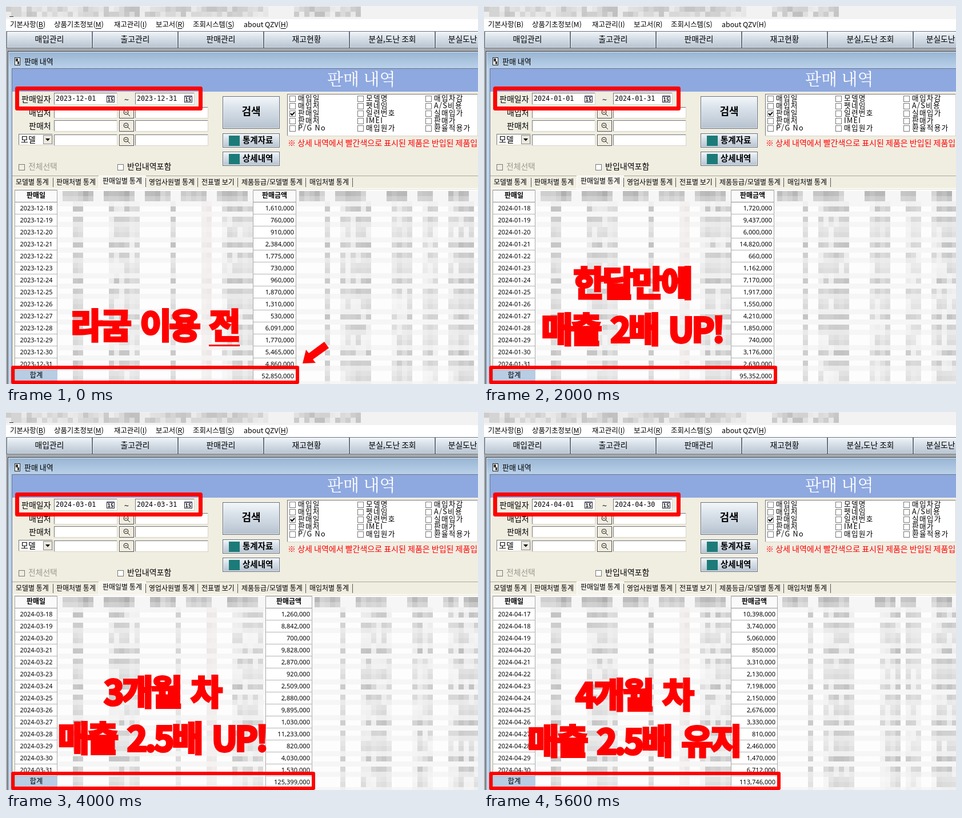
Write an HTML page with a canvas that moves like this. It is 826 by 662 pixels and loops after 6 s.

```html
<!DOCTYPE html>
<html lang="ko">
<head>
<meta charset="utf-8">
<style>
html, body { margin: 0; width: 100%; height: 100%; overflow: hidden; background: #fff; }
canvas { display: block; }
</style>
</head>
<body>
<canvas id="stage" width="826" height="662"></canvas>
<script>
const g = document.getElementById('stage').getContext('2d');
const SANS = '"Noto Sans CJK KR", "Noto Sans KR", sans-serif';
const SERIF = '"Noto Serif CJK KR", "Noto Sans CJK KR", serif';
const MONO = '"DejaVu Sans Mono", monospace';
const DIGITS = '"Noto Sans", sans-serif';
const RED = '#ff0000', FORM = '#f0ede1';
const CELL = 9, ROW = 21, TOP = 343;

// sums: daily amounts in thousands; edges: right edges of the blurred columns
const months = [
  { ym: '2023-12', last: 31, col: [432, 508], total: 52850,
    sums: '1610 760 910 2384 1775 730 960 1870 1310 530 6091 1770 5465 4860',
    edges: [135, 234, 297, 360, 432, 567, 639, 711, 756, 819],
    x: 262, y: 582, lines: ['라굼 이용 전'], arrow: true },
  { ym: '2024-01', last: 31, col: [432, 508], total: 95352,
    sums: '1720 9437 6000 14820 660 1162 7170 1917 1550 4210 1850 740 3176 2630',
    edges: [135, 234, 297, 360, 432, 567, 639, 711, 765, 828],
    x: 261, y: 508, lines: ['한달만에', '매출 2배 UP!'] },
  { ym: '2024-02', last: 29, col: [442, 518], total: 97734,
    sums: '3312 2860 2795 230 4759 9185 880 7725 1000 1630 1900 1100 4158 12500',
    edges: [135, 234, 306, 369, 441, 576, 648, 720, 774, 828],
    x: 267, y: 508, lines: ['2개월 차', '매출 2배 유지'] },
  { ym: '2024-03', last: 31, col: [454, 536], total: 125399,
    sums: '1260 8842 700 9828 2870 920 2509 2880 9895 1030 11233 820 4030 1530',
    edges: [135, 234, 306, 369, 450, 594, 675, 747, 801, 846],
    x: 275, y: 513, lines: ['3개월 차', '매출 2.5배 UP!'] },
  { ym: '2024-04', last: 30, col: [432, 514], total: 113746,
    sums: '10398 3740 5060 850 3310 2130 7198 2150 2676 3330 810 2460 1470 6712',
    edges: [135, 234, 297, 360, 432, 576, 648, 729, 765, 828],
    x: 264, y: 518, lines: ['4개월 차', '매출 2.5배 유지'] }
];
const bodyWidths = [18, 54, 9, 18, 54, 9, 54, 36, 27, 45];
const headWidths = [54, 54, 45, 45, 54, 45, 54, 36, 27, 36];

const noise = (a, b, c) => {
  const s = Math.sin(a * 12.9898 + b * 78.233 + c * 37.719) * 43758.5453;
  return s - Math.floor(s);
};
const overlap = (a, b, c, d) => Math.max(0, Math.min(b, d) - Math.max(a, c));

function rect(x, y, w, h, fill) {
  g.fillStyle = fill;
  g.fillRect(x, y, w, h);
}

function frame(x, y, w, h, stroke, fill) {
  if (fill) rect(x, y, w, h, fill);
  g.strokeStyle = stroke;
  g.lineWidth = 1;
  g.strokeRect(x + .5, y + .5, w - 1, h - 1);
}

function text(s, x, y, size = 14, { color = '#000', align = 'left', font = SANS, weight = 400, gap = 0 } = {}) {
  g.font = `${weight} ${size}px ${font}`;
  g.letterSpacing = gap + 'px';
  g.fillStyle = color;
  g.textAlign = align;
  g.fillText(s, x, y);
}

function shade(y, h, ...colors) {
  const grad = g.createLinearGradient(0, y, 0, y + h);
  colors.forEach((c, i) => grad.addColorStop(i / (colors.length - 1), c));
  return grad;
}

function button(x, y, w, h) {
  frame(x, y, w, h, '#63707e', shade(y, h, '#f5f8fb', '#dbe3eb', '#c9d3de', '#b4c0cd'));
  g.strokeStyle = '#ffffff90';
  g.strokeRect(x + 1.5, y + 1.5, w - 3, h - 3);
}

function field(x, y, w, h) {
  rect(x, y, w, h, '#fff');
  rect(x, y, w, 1, '#777');
  rect(x, y, 1, h, '#777');
  rect(x, y + h - 1, w, 1, '#d8d4c8');
  rect(x + w - 1, y, 1, h, '#d8d4c8');
}

function checkbox(x, y, on, fill = '#fff') {
  frame(x, y, 11, 11, '#777', fill);
  if (!on) return;
  g.strokeStyle = '#000';
  g.lineWidth = 2;
  g.beginPath();
  g.moveTo(x + 2, y + 5);
  g.lineTo(x + 4.5, y + 8);
  g.lineTo(x + 9, y + 3);
  g.stroke();
}

function calendar(x, y) {
  frame(x, y, 14, 12, '#223', '#fff');
  rect(x, y, 14, 2, '#446');
  text('15', x + 7, y + 10, 9, { align: 'center', font: MONO, weight: 700 });
}

function lens(y) {
  frame(198, y, 26, 20, '#555', FORM);
  rect(199, y + 1, 24, 1, '#fff');
  rect(199, y + 1, 1, 18, '#fff');
  g.strokeStyle = '#222';
  g.beginPath();
  g.arc(210, y + 9, 4, 0, 7);
  g.moveTo(213, y + 12);
  g.lineTo(217, y + 16);
  g.moveTo(208, y + 9);
  g.lineTo(212, y + 9);
  g.stroke();
}

function redBox(x, y, w, h, width) {
  g.strokeStyle = RED;
  g.lineWidth = width;
  g.lineJoin = 'round';
  g.strokeRect(x, y, w, h);
  g.lineJoin = 'miter';
}

function drawMenus(n) {
  rect(0, 0, 826, 23, '#f2f2f2');
  for (let x = 0; x < 621; x += CELL)
    for (let y = 0; y < 18; y += CELL)
      if (x < 455 || x > 500) {
        const v = 190 + 48 * noise(x, y, 3);
        rect(x, y + 1, CELL, CELL, `rgb(${v},${v},${v})`);
      }
  if (n === 0 || n === 3) rect(6, 18, 7, 1, '#333');

  rect(0, 23, 826, 21, '#fff');
  [[7, '기본사항', 'B'], [84, '상품기초정보', 'M'], [189, '재고관리', 'I'],
   [262, '보고서', 'R'], [327, '조회시스템', 'S'], [416, 'about QZV', 'H']].forEach(([x, label, key]) => {
    text(`${label}(${key})`, x, 37, 12.4);
    const left = x + g.measureText(label + '(').width;
    if (n !== 1) rect(left, 39, g.measureText(key).width, 1, '#000');
  });

  rect(0, 44, 826, 36, '#a5a9ad');
  ['매입관리', '출고관리', '판매관리', '재고현황', '분실,도난 조회', '분실도난 재고조회'].forEach((s, i) => {
    button(1 + i * 150, 44, 150, 30);
    text(s, 76 + i * 150, 63, 13.8, { align: 'center' });
  });
}

function drawWindow() {
  rect(0, 75, 826, 587, '#a5a9ad');
  rect(3, 79, 823, 583, '#2f3a47');
  rect(4, 80, 822, 582, '#b9d1ea');
  rect(4, 80, 822, 30, shade(80, 30, '#98b4d2', '#bbd2ea'));
  rect(4, 80, 822, 1, '#e8f0f8');
  rect(4, 80, 1, 582, '#e8f0f8');
  frame(15, 90, 10, 14, '#222', '#fff');
  rect(17, 92, 4, 5, '#333');
  rect(20, 97, 3, 5, '#333');
  text('판매 내역', 32, 102, 13);
  rect(10, 109, 816, 553, '#687586');
  rect(11, 110, 815, 552, FORM);
  rect(11, 110, 815, 40, '#8ea8e0');
  text('판매 내역', 562, 139, 29, { color: '#fff', font: SERIF, weight: 500 });
}

function drawForm(m) {
  text('판매일자', 27, 168);
  field(84, 152, 111, 21);
  field(226, 152, 104, 21);
  text(`${m.ym}-01`, 87, 166, 11.7, { font: MONO });
  text(`${m.ym}-${m.last}`, 229, 166, 11.7, { font: MONO });
  text('~', 207, 168, 13, { font: MONO });
  calendar(176, 157);
  calendar(312, 157);

  [177, 200, 225].forEach((y, i) => {
    field(84, y, 111, 20);
    field(226, y, 128, 20);
    lens(y);
    if (i < 2) text(['매입처', '판매처'][i], 40, y + 15);
  });
  field(22, 224, 60, 20);
  text('모델', 26, 239);
  frame(65, 226, 16, 16, '#888', '#ece9df');
  g.fillStyle = '#000';
  g.beginPath();
  g.moveTo(69, 232);
  g.lineTo(77, 232);
  g.lineTo(73, 236.5);
  g.fill();

  checkbox(22, 277, false, FORM);
  text('전체선택', 39, 286, 13.8, { color: '#9b988e' });
  checkbox(195, 277);
  text('반입내역포함', 212, 286, 14);

  button(379, 158, 100, 57);
  text('검색', 429, 191, 18, { align: 'center', weight: 700 });
  ['통계자료', '상세내역'].forEach((s, i) => {
    const y = 223 + i * 32;
    button(379, y, 100, 25);
    rect(390, y + 4, 19, 18, '#1c7b78');
    text(s, 414, y + 17, 14.5, { weight: 700 });
  });

  field(492, 154, 334, 74);
  [['매입일', '매입처', '판매일', '판매처', 'P/G No'],
   ['모델명', '펫네임', '일련번호', 'IMEI', '매입원가'],
   ['매입차감', 'A/S비용', '실매입가', '판매가', '환율적용가']].forEach((list, c) =>
    list.forEach((s, r) => {
      checkbox(496 + c * 119, 157 + r * 13, c === 0 && r === 2);
      text(s, 511 + c * 119, 166 + r * 13, 12.6, { gap: 1.3 });
    }));
  text('※ 상세 내역에서 빨간색으로 표시된 제품은 반입된 제품입니다.', 493, 245, 14, { color: RED });
}

function drawTabs() {
  rect(11, 297, 815, 1, '#aaa69a');
  rect(11, 319, 815, 1, '#fff');
  frame(162, 297, 83, 24, '#fff', '#f6f4ec');
  [[17, '모델별 통계', 82], [88, '판매처별 통계', 162], [169, '판매일별 통계', 244],
   [250, '영업사원별 통계', 335], [342, '전표별 보기', 405],
   [412, '제품등급/모델별 통계', 524], [531, '매입처별 통계', 606]].forEach(([x, s, end], i) => {
    text(s, x, i === 2 ? 311 : 313, 12);
    if (i !== 1) rect(end, 301, 1, 16, '#555');
  });
}

// Averages imaginary table text over a coarse grid
function drawMosaic(m, n) {
  for (let x = 90; x < 826; x += CELL)
    for (let y = 324; y < 662; y += CELL) {
      const head = y < TOP - 1;
      const k = Math.max(0, Math.floor((y - TOP) / ROW));
      let cover = 0, row = 0;
      for (let r = k; r <= k + 1; r++) {
        const part = overlap(y, y + CELL, 350 + r * ROW, 359 + r * ROW) / CELL;
        if (part > cover) row = r;
        cover += part;
      }
      if (head) cover = y < 333 ? 1 : .7;
      const line = (y - TOP + ROW * 2) % ROW > ROW - CELL;
      let v = head || line ? 246 : 253, pink = 0;
      m.edges.forEach((edge, i) => {
        const w = (head ? headWidths : bodyWidths)[i];
        const right = head ? edge + (i ? -9 : 18) : edge;
        if (x < right - w || x >= right) return;
        const pos = (x - right + w) / w;
        const faint = !head && w > 20 && noise(x, row, n) < .45 * (1 - pos);
        let depth = 30 + 30 * noise(x, head ? 1 : 0, 5) + 12 * noise(x, row, 7);
        if (faint) depth *= .35;
        if (!head && w === 18 && i === 3) {
          depth *= .35;
          pink = 4;
        }
        v -= cover * depth;
      });
      rect(x, y, CELL, CELL, `rgb(${v},${v - pink},${v - pink})`);
    }
}

function drawTable(m, n) {
  const [left, right] = m.col;
  rect(15, 322, 811, 340, '#fff');
  drawMosaic(m, n);
  const sums = m.sums.split(' ').map(Number);
  const won = v => v.toLocaleString('en-US') + ',000';

  [[15, 90, '판매일'], [left, right, '판매금액']].forEach(([a, b, title]) => {
    rect(a, 322, b - a, 340, '#fff');
    frame(a, 322, b - a, 22, '#8f8f8f', '#fafafa');
    text(title, (a + b) / 2, 336, 12, { align: 'center', weight: 700 });
    rect(a, 322, 1, 340, '#a8a8a8');
    rect(b - 1, 322, 1, 340, '#a8a8a8');
    for (let i = 1; i <= 15; i++) rect(a, TOP + i * ROW, b - a, 1, '#b4b4b4');
  });
  sums.forEach((v, i) => {
    const y = 358 + i * ROW;
    text(`${m.ym}-${m.last - 13 + i}`, 53, y, 10.9, { align: 'center', font: DIGITS });
    text(won(v), right - 4, y, 11.1, { align: 'right', font: DIGITS });
  });
  rect(16, 638, 74, 20, '#b8cce4');
  text('합계', 53, 651, 12.4, { align: 'center' });
  text(won(m.total), right - 4, 652, 11.1, { align: 'right', font: DIGITS });
}

function drawMarks(m) {
  redBox(19.5, 144.5, 321, 35, 7);
  redBox(12, 633, m.col[1] - 10, 26, 6);

  g.wordSpacing = '9px';
  m.lines.forEach((s, i) => {
    const y = m.y + i * 81;
    text(s, m.x - 2, y, 60, { color: RED, align: 'center', weight: 900, gap: -4 });
    g.strokeStyle = RED;
    g.lineWidth = 4;
    g.strokeText(s, m.x - 2, y);
  });
  g.wordSpacing = '0px';

  if (!m.arrow) return;
  rect(355, 593, 54, 3, RED);
  g.fillStyle = RED;
  g.beginPath();
  [[519, 626], [525, 602], [530, 608], [557, 588], [565, 599], [537, 619], [542, 625]]
    .forEach(p => g.lineTo(...p));
  g.fill();
}

let shown = -1;
function tick(now) {
  const n = Math.max(0, Math.floor(now % 6000 / 1000) - 1);
  if (n !== shown) {
    const m = months[n];
    drawMenus(n);
    drawWindow();
    drawForm(m);
    drawTabs();
    drawTable(m, n);
    drawMarks(m);
    shown = n;
  }
  requestAnimationFrame(tick);
}
tick(performance.now());
</script>
</body>
</html>
```
